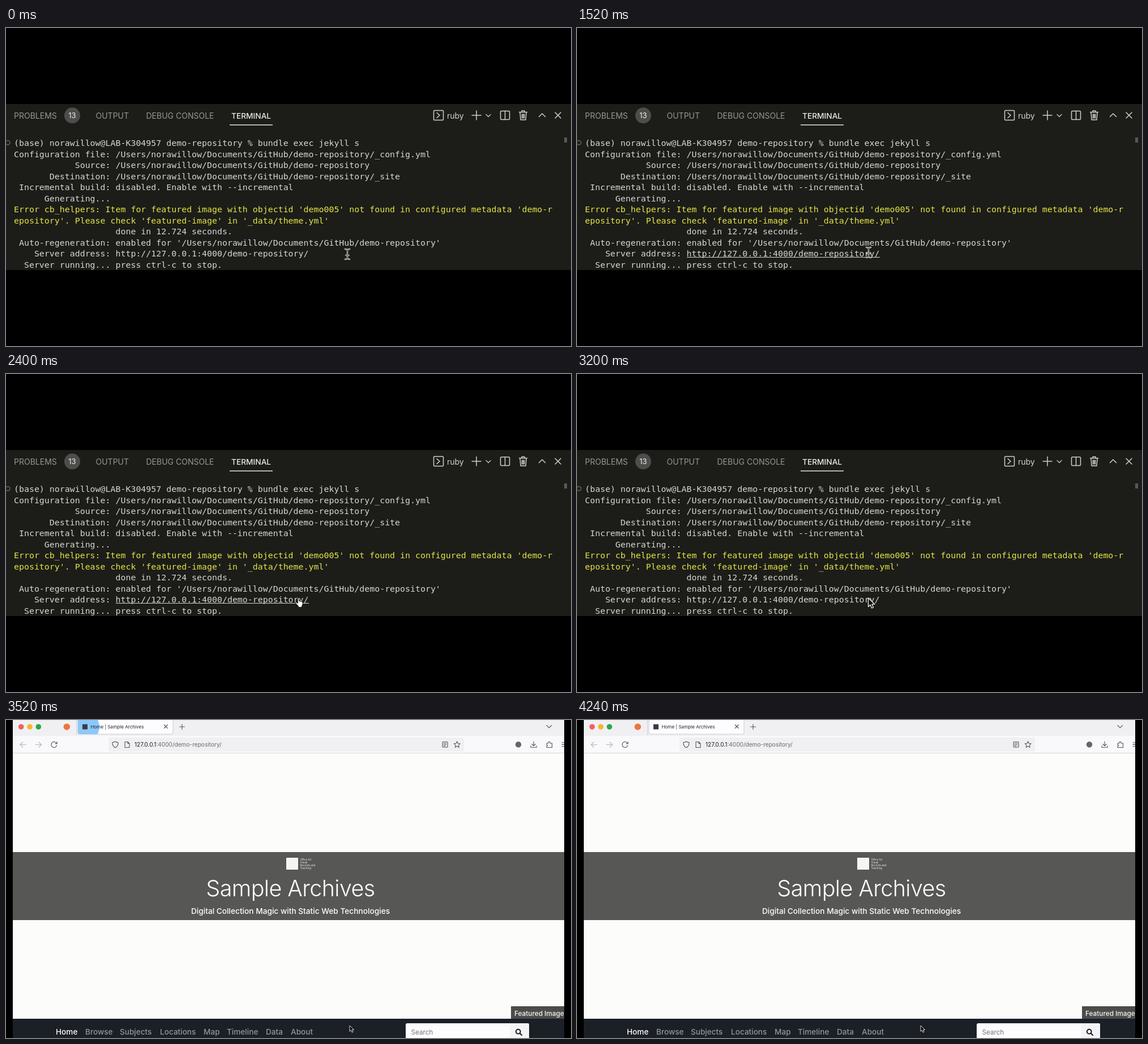
An HTML page for the animation above (4320 ms loop, 998 by 561 pixels).

```html
<!DOCTYPE html>
<html lang="en">
<head>
<meta charset="utf-8">
<title>Serve and open a local site</title>
<style>
  html, body { margin: 0; width: 100%; height: 100%; overflow: hidden; background: #000; }
  svg { display: block; width: 998px; height: 561px; }
  text { font-family: Inter, "Open Sans", sans-serif; white-space: pre; }
  .mono text { font: 14.92px "DejaVu Sans Mono", monospace; fill: #d6d6d2; }
  .mono .warn { fill: #e4e545; }
  .tabs text { font-size: 14px; fill: #969693; }
  .tabs .on { fill: #ebebe8; font-weight: 500; }
  .line { fill: none; stroke-linecap: round; stroke-linejoin: round; }
  .nav text { font-size: 13.6px; font-weight: 500; fill: #92969a; }
  .nav .on { fill: #fff; }
</style>
</head>
<body>
<svg viewBox="0 0 998 561">
  <defs>
    <clipPath id="panelClip"><rect y="134" width="998" height="293"/></clipPath>
    <clipPath id="windowClip"><rect x="12" width="974" height="561"/></clipPath>
    <clipPath id="tabClip"><rect x="127" y="-4" width="168" height="29" rx="3"/></clipPath>
    <path id="arrow" d="M0 0V15.5L3.6 12.2L6.2 18L9 16.8L6.5 11.2H11.3Z" fill="#080808" stroke="#f4f4f4" stroke-width="1.3" stroke-linejoin="round"/>
  </defs>

  <g id="terminal" clip-path="url(#panelClip)">
    <rect y="134" width="998" height="293" fill="#1c1d19"/>
    <g class="tabs">
      <text x="14" y="159.5">PROBLEMS</text>
      <circle cx="117" cy="154.3" r="14" fill="#4d4d4c"/>
      <text x="117" y="159" text-anchor="middle" style="font-size:13px;fill:#f2f2f0">13</text>
      <text x="158.5" y="159.5">OUTPUT</text>
      <text x="247.5" y="159.5">DEBUG CONSOLE</text>
      <text x="398" y="159.5" class="on" style="font-size:13.7px">TERMINAL</text>
      <path d="M395 171H471" stroke="#e5e5e2" stroke-width="1.3"/>
      <text x="779" y="159.5" style="fill:#d3d3d0">ruby</text>
    </g>
    <g class="line" stroke="#cfcfcc" stroke-width="1.5">
      <rect x="755.5" y="145.5" width="17" height="17" rx="1.5"/>
      <path d="M761 149.5L766 154L761 158.5"/>
      <path d="M823 154H839M831 146V162"/>
      <path d="M848 152.5L852 156.5L856 152.5" stroke-width="1.2"/>
      <rect x="873.5" y="146.5" width="16" height="15" rx="1.5"/>
      <path d="M881.5 146.5V161.5"/>
      <path d="M906.5 148.5H920.5M911 148V146H916V148M908 149L909 162H918L919 149M911.5 152V159M913.5 152V159M915.5 152V159"/>
      <path d="M941.5 156.5L947 151L952.5 156.5"/>
      <path d="M970 149L980 159M980 149L970 159"/>
    </g>
    <circle cx="3.2" cy="202.3" r="3.8" fill="none" stroke="#62625f" stroke-width="1.5"/>
    <rect x="986" y="193" width="5" height="9" fill="#585856"/>
    <g id="log" class="mono"></g>
    <path id="linkLine" d="M194 404.5H535" stroke="#d6d6d2" stroke-width="1.2"/>
    <g id="ibeam" class="line">
      <path id="beamShape" d="M-4 -9Q0 -9 0 -5.5Q0 -9 4 -9M0 -6V6M-4 9Q0 9 0 5.5Q0 9 4 9M-2.5 2H2.5" stroke="#e9e9e6" stroke-width="2.4"/>
      <path d="M-4 -9Q0 -9 0 -5.5Q0 -9 4 -9M0 -6V6M-4 9Q0 9 0 5.5Q0 9 4 9M-2.5 2H2.5" stroke="#222" stroke-width=".8"/>
    </g>
    <path id="hand" transform="translate(511 395)" d="M4 1.2Q5.3 -.3 6.3 1.2L7 6Q8.5 4.9 9.3 6.4Q10.8 5.5 11.4 7Q13 6.5 13.2 8.3Q13.4 12 11.7 14V16.5H5.5V14.5Q3 12 .8 9.5Q.5 7.4 2.4 7.8L4.4 9.5Z" fill="#fafafa" stroke="#161616" stroke-width="1"/>
    <use id="pointer" href="#arrow" x="514.5" y="395"/>
  </g>

  <g id="browser" clip-path="url(#windowClip)">
    <rect x="12" width="974" height="561" fill="#fcfcfb"/>
    <rect x="12" width="974" height="28" fill="#f0f0f3"/>
    <rect x="12" y="28" width="974" height="30" fill="#f9f9fb"/>
    <path d="M12 58.3H986" stroke="#d5d5df"/>
    <circle cx="26.7" cy="12" r="4.8" fill="#f5605a"/>
    <circle cx="42" cy="12" r="4.8" fill="#f6b52f"/>
    <circle cx="57.3" cy="12" r="4.8" fill="#2ca746"/>
    <circle cx="107.3" cy="12" r="5.8" fill="#ed7541"/>
    <path d="M124.5 0V27" stroke="#d0d0d5"/>
    <rect x="127" y="-4" width="168" height="29" rx="3" fill="#fdfdff" stroke="#c6c6ce" stroke-width=".9"/>
    <g clip-path="url(#tabClip)"><circle id="burst" cx="140" cy="12" fill="#81c3fa"/></g>
    <g class="line" stroke="#54545c" stroke-width="1.1">
      <path d="M279.3 8.5L285.3 14.5M285.3 8.5L279.3 14.5M306.5 12H315.5M311 7.5V16.5M955 9.5L959.3 13.8L963.6 9.5"/>
      <path d="M35.5 43.5H25M29.5 39L25 43.5L29.5 48M52 43.5H62.5M58 39L62.5 43.5L58 48" stroke="#b3b3ba"/>
      <path id="reload" d="M89.3 41A5 5 0 1 0 89.8 44.5M90 38.5V41.8H86.7"/>
      <path d="M932 38V45.5M928.8 42.5L932 45.7L935.2 42.5M927 45.5V48.3H937V45.5"/>
      <path d="M955 41H957.8V39.8Q959.4 36.5 961 39.8V41H964.5V48.5H955V46.2Q958.6 45 955 43.7Z"/>
      <path d="M982 40H988M982 43.4H988M982 46.8H988"/>
    </g>
    <circle cx="905" cy="43.3" r="5.2" fill="#65656d"/>
    <rect x="181" y="31" width="628" height="24.5" rx="2.5" fill="#f0f0f3"/>

    <g id="blank">
      <text x="133.5" y="15" font-size="8.1" fill="#25252b">New Tab</text>
      <g class="line" stroke="#54545c" stroke-width="1.2"><circle cx="192" cy="42" r="3.8"/><path d="M194.8 44.8L198 48"/></g>
      <text x="206" y="47.2" font-size="10.3" fill="#62626b">Search with Tavuno or enter address</text>
    </g>

    <g id="site">
      <rect x="135" y="7.5" width="9" height="9" fill="#3b3b42"/>
      <text x="149.5" y="15" font-size="8.1" fill="#25252b">Home | Sample Archives</text>
      <g class="line" stroke="#54545c" stroke-width="1.1">
        <path d="M193 38Q195.5 39.5 198 39.5Q198.5 46 193 48.8Q187.5 46 188 39.5Q190.5 39.5 193 38Z"/>
        <path d="M210 38.5H215L218 41.5V48.5H210ZM215 38.5V41.5H218"/>
        <rect x="771" y="38.5" width="9" height="9.5" rx="1"/>
        <path d="M773.2 41H777.8M773.2 43.3H777.8M773.2 45.6H776"/>
        <path id="star"/>
      </g>
      <text x="227" y="47.2" font-size="10.1" fill="#1d1d23">127.0.0.1<tspan fill="#686870">:4000/demo-repository/</tspan></text>

      <rect x="12" y="233" width="974" height="120" fill="#575756"/>
      <rect x="495" y="243" width="21" height="21" fill="#f5f5f5"/>
      <g id="motto" font-size="4.5" fill="#eee"></g>
      <text x="502.5" y="311" text-anchor="middle" font-size="39.5" font-weight="300" letter-spacing="-.6" fill="#fff">Sample Archives</text>
      <text x="502.5" y="342" text-anchor="middle" font-size="13.7" font-weight="500" fill="#fff">Digital Collection Magic with Static Web Technologies</text>

      <rect x="892" y="505" width="94" height="22" fill="#4c4c4b"/>
      <text x="898" y="521.5" font-size="11.8" font-weight="500" fill="#f5f5f5">Featured Image</text>
      <rect x="12" y="527" width="974" height="34" fill="#1b2027"/>
      <g id="nav" class="nav"></g>
      <rect x="706" y="535" width="218" height="32" rx="3" fill="#fdfdfd"/>
      <path d="M890 535H921Q924 535 924 538V561H890Z" fill="#f3f4f5"/>
      <text x="715.5" y="554.5" font-size="11.7" fill="#71777d">Search</text>
      <g class="line" stroke="#17181b" stroke-width="2"><circle cx="904.7" cy="549.7" r="3.9"/><path d="M907.7 552.7L911 556"/></g>
    </g>
    <use href="#arrow" transform="translate(607 539) scale(.67)"/>
  </g>
</svg>
<script>
const LOOP = 4320, STEP = 80;
const HAND_AT = 1920, CLICK_AT = 2880, BROWSER_AT = 3280, LOADED_AT = 3440;
const $ = id => document.getElementById(id);
const show = (id, on) => $(id).setAttribute('display', on ? 'inline' : 'none');
const progress = (t, from, to) => Math.min(1, Math.max(0, (t - from) / (to - from)));
const ease = p => p * p * (3 - 2 * p);

function addText(parent, x, y, content, className = '') {
  const el = document.createElementNS('http://www.w3.org/2000/svg', 'text');
  el.setAttribute('x', x);
  el.setAttribute('y', y);
  el.setAttribute('class', className);
  el.textContent = content;
  $(parent).append(el);
}

const home = '/Users/norawillow/Documents/GitHub/demo-repository';
const field = (label, value) => label.padStart(19) + ' ' + value;
[
  '(base) norawillow@LAB-K304957 demo-repository % bundle exec jekyll s',
  field('Configuration file:', home + '/_config.yml'),
  field('Source:', home),
  field('Destination:', home + '/_site'),
  field('Incremental build:', 'disabled. Enable with --incremental'),
  field('Generating...', ''),
  "Error cb_helpers: Item for featured image with objectid 'demo005' not found in configured metadata 'demo-r",
  "epository'. Please check 'featured-image' in '_data/theme.yml'",
  field('', 'done in 12.724 seconds.'),
  field('Auto-regeneration:', `enabled for '${home}'`),
  field('Server address:', 'http://127.0.0.1:4000/demo-repository/'),
  field('Server running...', 'press ctrl-c to stop.')
].forEach((line, i) => {
  // "Generating..." is not aligned to the label column like the others
  const content = line.includes('Generating') ? '      Generating...' : line;
  addText('log', 14, 208 + i * 19.5, content, i === 6 || i === 7 ? 'warn' : '');
});

['Office for', 'Visual', 'Records and', 'Teaching']
  .forEach((line, i) => addText('motto', 519.5, 247.5 + i * 5, line));

Object.entries({ Home: 88, Browse: 140, Subjects: 201, Locations: 272, Map: 349, Timeline: 390, Data: 459, About: 503 })
  .forEach(([label, x]) => addText('nav', x, 555, label, label === 'Home' ? 'on' : ''));

const starPoints = Array.from({ length: 10 }, (_, i) => {
  const a = i * Math.PI / 5, r = i % 2 ? 2.8 : 5.8;
  return [796.7 + r * Math.sin(a), 43.5 - r * Math.cos(a)];
});
$('star').setAttribute('d', 'M' + starPoints.join('L') + 'Z');

function draw(t) {
  const inBrowser = t >= BROWSER_AT, loaded = t >= LOADED_AT;
  show('terminal', !inBrowser);
  show('browser', inBrowser);

  const p = ease(progress(t, 320, 1280));
  const x = 603 - 88 * p, y = 399 - 3 * p;
  $('ibeam').setAttribute('transform', `translate(${x} ${y})`);
  show('ibeam', t < HAND_AT);
  show('hand', t >= HAND_AT && t < CLICK_AT);
  show('pointer', t >= CLICK_AT);
  show('linkLine', x < 535 && t < CLICK_AT);

  show('blank', !loaded);
  show('site', loaded);
  $('reload').setAttribute('stroke', loaded ? '#54545c' : '#b3b3ba');
  const age = t - LOADED_AT;
  $('burst').setAttribute('r', loaded ? 5 + age * 0.25 : 0);
  $('burst').setAttribute('opacity', 0.9 * (1 - progress(age, 80, 360)));
}

const start = performance.now();
function tick() {
  const t = (performance.now() - start) % LOOP;
  draw(Math.floor(t / STEP) * STEP);
  requestAnimationFrame(tick);
}
tick();
</script>
</body>
</html>
```
